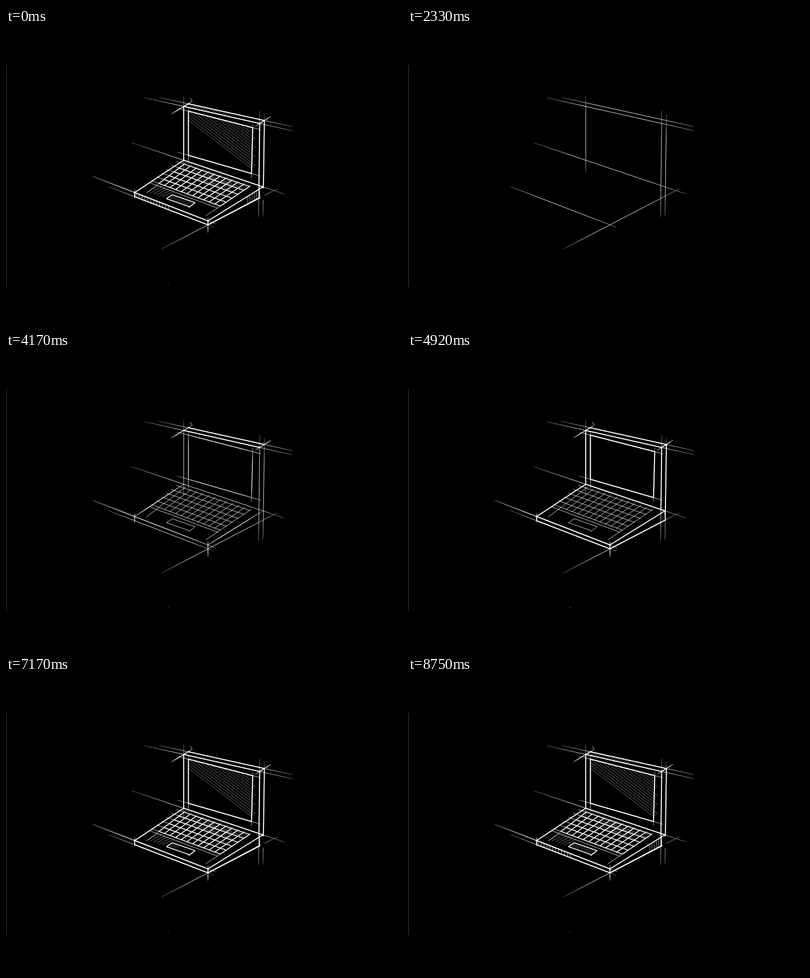
An HTML page with a canvas for the animation above (9.08 s loop, 800 px wide and 600 px high).

```html
<!DOCTYPE html>
<html lang="en">
<head>
<meta charset="utf-8">
<title>Laptop sketch</title>
<style>
  html, body { margin: 0; width: 100%; height: 100%; overflow: hidden; background: #000; }
  canvas { display: block; width: 800px; height: 600px; }
</style>
</head>
<body>
<canvas id="stage" width="800" height="600"></canvas>
<script>
const ctx = document.getElementById('stage').getContext('2d');
const FPS = 12, LOOP_STEPS = 109, DRAW_STEPS = 84, DRAW_START = 21, ERASE_SPEED = 5;

// Corners of the laptop
const lidTL = [359, 159], lidTR = [512.5, 193.5], lidBR = [511, 319];
const backTL = [368, 153.5], backTR = [522, 187.5], backBR = [520, 322];
const screenTL = [368.5, 168.5], screenTR = [498.5, 202];
const screenBL = [368.5, 258], screenBR = [496, 295];
const hingeL = [359, 268], hingeR = [519, 322];
const frontL = [260, 333.5], frontR = [408, 391];
const baseL = [260, 342], baseR = [408, 399];
const sideOuter = [520, 340.5], sideInner = [512.5, 343.5];

// Points on the keyboard and the trackpad, u across and v towards the viewer
const key = (u, v) => [360 + 132 * u - 51 * v - 8 * u * v, 276 + 45 * u + 39 * v + u * v];
const pad = (u, v) => [336 + 46 * u - 12 * v, 338 + 16 * u + 8 * v];

const series = (count, make) => Array.from({ length: count }, (_, i) => make(i));
const mix = (a, b, t) => a.map((value, i) => value + (b[i] - value) * t);

// Lengthens a line by some pixels at each end.
function extend(a, b, before, after) {
  const length = Math.hypot(b[0] - a[0], b[1] - a[1]);
  return [mix(a, b, -before / length), mix(a, b, 1 + after / length)];
}

const strokes = [];

// Adds lines that are drawn one after another between two steps.
function group(from, to, style, lines) {
  const share = (to - from) / lines.length;
  lines.forEach(([a, b], i) => strokes.push({
    color: '255,255,255', alpha: 1, width: 1, dash: [], ...style,
    a, b, start: from + i * share, share
  }));
}

const guide = { alpha: 0.95, taper: true };
const thin = { alpha: 0.85 };
const bold = { width: 2 };
const hatch = { alpha: 0.45 };

// Each edge with how far its guide line runs past both corners
const edges = [
  [backTL, backTR, 60, 57],
  [lidTL, lidTR, 81, 67],
  [lidTL, hingeL, 20, 23],
  [lidTR, lidBR, 26, 64],
  [backTR, backBR, 13, 58],
  [hingeL, hingeR, 111, 45],
  [baseR, sideOuter, 106, 32],
  [baseL, baseR, 57, 13],
  [frontL, frontR, 91, 16],
  [lidTL, backTL, 30, 10],
  [lidTR, backTR, 11, 16],
  [screenTL, screenTR, 24, 17],
  [screenTL, screenBL, 8, 18],
  [screenTR, screenBR, 8, 9],
  [screenBL, screenBR, 24, 20],
  [hingeL, frontL, 2, 4],
  [hingeR, frontR, 0, 2],
  [frontL, baseL, 7, 4],
  [frontR, baseR, 8, 16]
];
const guides = edges.map(edge => extend(...edge));
const keyRow = (v, over) => [key(-over, v), key(1 + over / 12, v)];
const keyColumn = (i, before, after) => [key(i / 11, -before), key(i / 11, 1 + after)];

group(0, 7, guide, guides.slice(0, 8));
group(7, 15, { ...guide, width: 1.4 }, guides.slice(8));
group(15, 16, thin, [[[372, 142], [376, 148]], [[327, 517.5], [328, 517.5]]]);

// Light grid of the keyboard
group(16, 19, thin, [...series(6, i => keyRow(i / 5, 0.12)), keyRow(1.1, 0.12)]);
group(19, 21, thin, [
  keyColumn(0, 0.07, 0.5), keyColumn(11, 0.05, 0.5),
  ...series(3, i => keyColumn(i + 1, 0.05, 0.02))
]);
group(21, 26, thin, series(7, i => keyColumn(i + 4, 0.05, 0.02)));

const padOutline = [
  [pad(0, 1), pad(0, 0)], [pad(0, 0), pad(1, 0)],
  [pad(1, 0), pad(1.03, 1.2)], [pad(1, 1), pad(0, 1)]
];
group(26, 28, thin, padOutline);

// Heavy outline
group(28, 38, bold, [...edges, [hingeR, sideOuter]]);

// Heavy keys, and the right-hand corner moved inwards
group(38, 43, { width: 1.8 }, series(6, i => keyRow(i / 5, 0)));
group(42, 47, { width: 1.7 }, series(12, i => keyColumn(i, 0, 0)));
group(46, 48, { color: '0,0,0', width: 5 }, [
  extend(backBR, sideOuter, -3, 8), extend(sideInner, sideOuter, -1, 2)
]);
group(47, 51, { width: 1.8 }, [[lidBR, sideInner], [sideInner, baseR], ...padOutline]);

// Screen shading: parallel lines that start at the left or top edge
group(51, 59, hatch, series(14, i => {
  const rise = 6 * i, slope = 0.77, topSlope = 0.258;
  const x = Math.max(0, (rise - 18) / (slope - topSlope));
  const end = Math.max(x, 128 + (i % 3) * 3.5);
  const at = dx => [369 + dx, 187 - rise + slope * dx];
  return [at(x), at(end)];
}));

// Shading of the keys and the palm rest
group(59, 61, hatch, series(10, i => {
  const u = 0.1 + i * 0.06, v = 0.1 * (i % 4);
  return [key(u, v), key(u + 0.4, v + 0.06)];
}));
group(61, 63, hatch, series(6, i => [[285 + i * 6, 333 + i * 2], [310 + i * 6, 318 + i * 2.5]]));

// Dotted trackpad
const dots = { alpha: 0.75, dash: [1.2, 1.8] };
const padLine = i => [pad(0.06 + i * 0.06, 0.1), pad(0.09 + i * 0.06, 0.95)];
group(63, 65, dots, series(6, padLine));
group(65, 70, dots, series(9, i => padLine(i + 6)));

// Shading of the front, the top and the right side
const ticks = (count, a, b, c, d) => series(count, i => {
  const t = (i + 0.5) / count;
  return [mix(a, b, t), mix(c, d, t)];
});
group(70, 75, { alpha: 0.75 }, ticks(12, frontL, mix(frontL, frontR, 0.48), baseL, mix(baseL, baseR, 0.48)));
group(75, 80, { alpha: 0.55 }, ticks(13, lidTL, mix(lidTL, lidTR, 0.55), backTL, mix(backTL, backTR, 0.55)));
group(80, 84, { alpha: 0.6 }, ticks(6,
  mix(hingeR, frontR, 0.3), mix(hingeR, frontR, 0.05),
  mix(sideInner, baseR, 0.25), sideInner));

function paint({ a, b, start, share, color, alpha, width, dash, taper }, step) {
  const part = Math.min(1, (step - start) / share);
  if (part <= 0) return;
  const tint = strength => `rgba(${color},${strength * alpha})`;
  ctx.strokeStyle = tint(1);
  if (taper) {
    const fade = ctx.createLinearGradient(...a, ...b);
    fade.addColorStop(0, tint(0.35));
    fade.addColorStop(0.25, tint(1));
    fade.addColorStop(0.75, tint(1));
    fade.addColorStop(1, tint(0.45));
    ctx.strokeStyle = fade;
  }
  ctx.lineWidth = width;
  ctx.setLineDash(dash);
  ctx.beginPath();
  ctx.moveTo(...a);
  ctx.lineTo(...mix(a, b, part));
  ctx.stroke();
}

// The finished sketch is quickly undrawn, then drawn again stroke by stroke.
function sketchStep(time) {
  const n = Math.floor((time + 4) * FPS / 1000) % LOOP_STEPS;
  if (n < DRAW_START) return DRAW_STEPS - n * ERASE_SPEED;
  return Math.min(DRAW_STEPS, n - DRAW_START);
}

const origin = performance.now();
function render() {
  const step = sketchStep((performance.now() - origin) % 9080);
  ctx.fillStyle = '#000';
  ctx.fillRect(0, 0, 800, 600);
  ctx.fillStyle = '#444';
  ctx.fillRect(0, 75, 1, 450);
  strokes.forEach(stroke => paint(stroke, step));
  requestAnimationFrame(render);
}
render();
</script>
</body>
</html>
```
